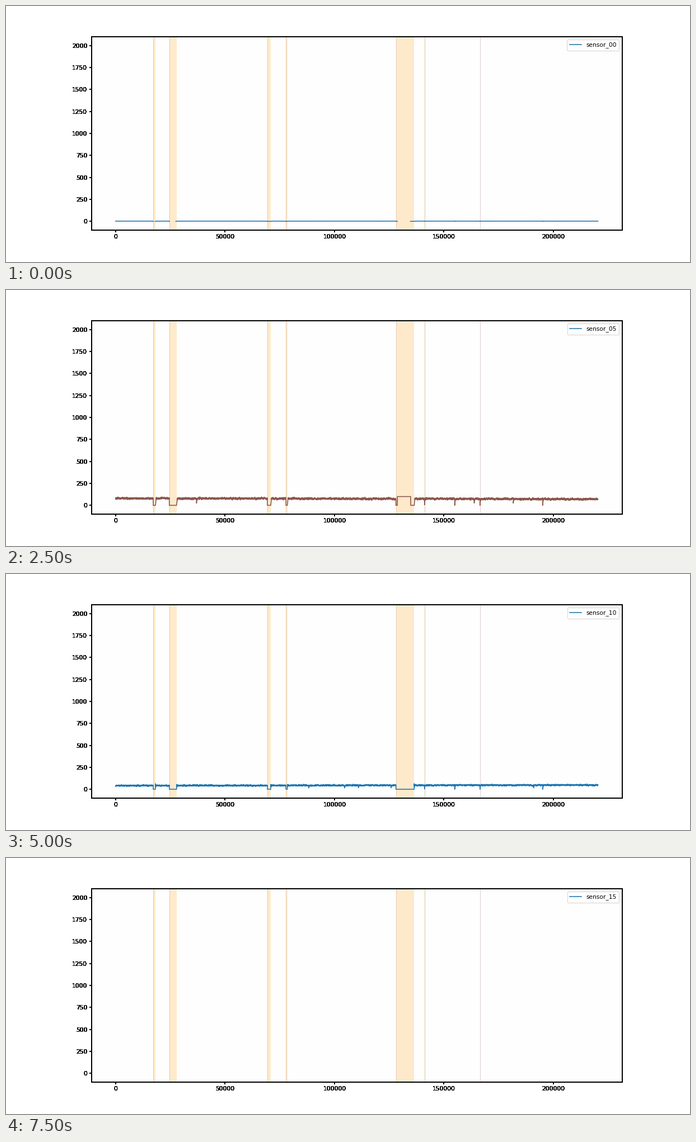
A matplotlib script that plays this animation: 1222x458 px, repeating every 8 s.

```python
import numpy as np
import matplotlib.pyplot as plt
from matplotlib.animation import FuncAnimation
from matplotlib.lines import Line2D

W, H = 1222, 458
DPI = W / 16
COUNT, STEP_MS = 16, 500
plt.rcParams.update({"font.family": "DejaVu Sans", "font.size": 10})

# Times are in thousands of samples.
END = 220.32
t = np.linspace(0, END, 11017)
OUTAGES = [(17.155, 18.2), (24.51, 27.85), (69.32, 70.87),
           (77.79, 78.45), (128.04, 136.4)]
TRIPS = (141.13, 166.44)
GLITCHES = (154.9, 195.1)
LONG_GAP = (130.1, 134.7)


def between(span):
    return (t >= span[0]) & (t < span[1])


def kick(y, places, value, tau):
    """Jump to a value, then return exponentially."""
    for p in places:
        after = between((p, p + 8 * tau))
        y[after] += (value - y[after]) * np.exp((p - t[after]) / tau)


def trace(seed, level, rough=0.03, trend=0, low=0, ramp=0.3,
          minor=0, tau=0.15, peak=0, gaps=()):
    """Noisy level with outages, recoveries and random minor dips."""
    rng = np.random.default_rng(seed)
    drift = np.interp(t, np.linspace(0, END, 600), rng.normal(0, 0.5, 600))
    y = level + trend * t / END + level * rough * (
        rng.normal(0, 0.8, t.size) + drift)
    kick(y, rng.uniform(2, END, minor), low + 0.3 * (level - low), tau)
    for a, b in OUTAGES:
        back = between((b, b + ramp))
        y[back] = low + (y[back] - low) * (t[back] - b) / ramp
        y[between((a, b))] = low
        if peak:
            kick(y, [b], peak * level, 0.08)
    kick(y, TRIPS + GLITCHES, low, 0.12)
    for span in gaps:
        y[between(span)] = np.nan
    return y


def small(seed, level):
    return trace(seed, level, low=3, peak=1.4, gaps=[LONG_GAP])


def capped():
    """Signal that saturates at 100, also during the longest outage."""
    y = np.minimum(trace(5, 80, rough=0.075, trend=-9, minor=3), 100)
    y[between((128.7, 134.8))] = 100
    return y


def stepped():
    """Level that changes in random blocks and rises late on."""
    rng = np.random.default_rng(13)
    blocks = rng.uniform(0, 5, 40) + np.linspace(0, 14, 40) ** 2 / 14
    return trace(13, 2, rough=0.4) + blocks[(t / END * 39).astype(int)]


series = [
    trace(0, 2.4, gaps=[(17.2, 18), (24.6, 27.5), (128.7, 134.7)]),
    trace(1, 47, trend=2, minor=4),
    trace(2, 51, rough=0.02, low=42),
    trace(3, 45, rough=0.02, low=37, ramp=1.8, minor=20),
    trace(4, 630, rough=0.015, low=3, minor=3, peak=1.25),
    capped(),
    small(6, 14), small(7, 17), small(8, 16), small(9, 15.5),
    trace(10, 43, rough=0.1, trend=6, low=1, minor=5, peak=1.5),
    trace(11, 43, rough=0.07, trend=4, minor=6),
    trace(12, 33, rough=0.085, trend=4, ramp=1.5, minor=22, tau=0.4),
    stepped(),
    trace(14, 420, rough=0.007, low=33),
    np.full(t.size, np.nan),
]

fig = plt.figure(figsize=(W / DPI, H / DPI), dpi=DPI, facecolor="white")
LEFT, RIGHT, TOP, BOTTOM = 152.75, 1100.6, 55, 401
BOX = [LEFT / W, 1 - BOTTOM / H, (RIGHT - LEFT) / W, (BOTTOM - TOP) / H]
PX = 72 / DPI


def add_axes(name):
    ax = fig.add_axes(BOX, label=name)
    ax.set(xlim=(-0.05 * END, 1.05 * END), ylim=(-100, 2100),
           xticks=range(0, 201, 50), yticks=range(0, 2001, 250))
    ax.set_xticklabels([str(1000 * x) for x in range(0, 201, 50)])
    return ax


# Stacked labels build up the heavy look of the tick text.
for i in range(9):
    layer = add_axes(f"layer{i}")
    layer.patch.set_visible(False)
    layer.spines[:].set_visible(False)
    layer.tick_params(width=0)

ax = add_axes("main")
ax.set_facecolor("#fefefe")
ax.spines[:].set_linewidth(2 * PX)
ax.tick_params(width=2 * PX)

for a, b in OUTAGES:
    ax.axvspan(a, b, facecolor="#feeacb", lw=0, zorder=0.5)
    ax.axvline(a, color="#e6c8b0", lw=PX, zorder=0.6)
for p, color in zip(TRIPS, ("#d9c497", "#dfcbd0")):
    ax.axvline(p, color=color, lw=PX, zorder=0.6)

line, = ax.plot([], [], lw=1.5)
key = Line2D([], [], lw=1.5, color="C0")
legend = ax.legend([key], ["sensor_00"], loc="upper right")
key_text = legend.get_texts()[0]


def update(i):
    line.set_data(t, series[i])
    line.set_color(f"C{i % 10}")
    key_text.set_text(f"sensor_{i:02d}")
    return line, legend


anim = FuncAnimation(fig, update, frames=COUNT, interval=STEP_MS,
                     repeat=True, repeat_delay=0, blit=False)
plt.show()
```
